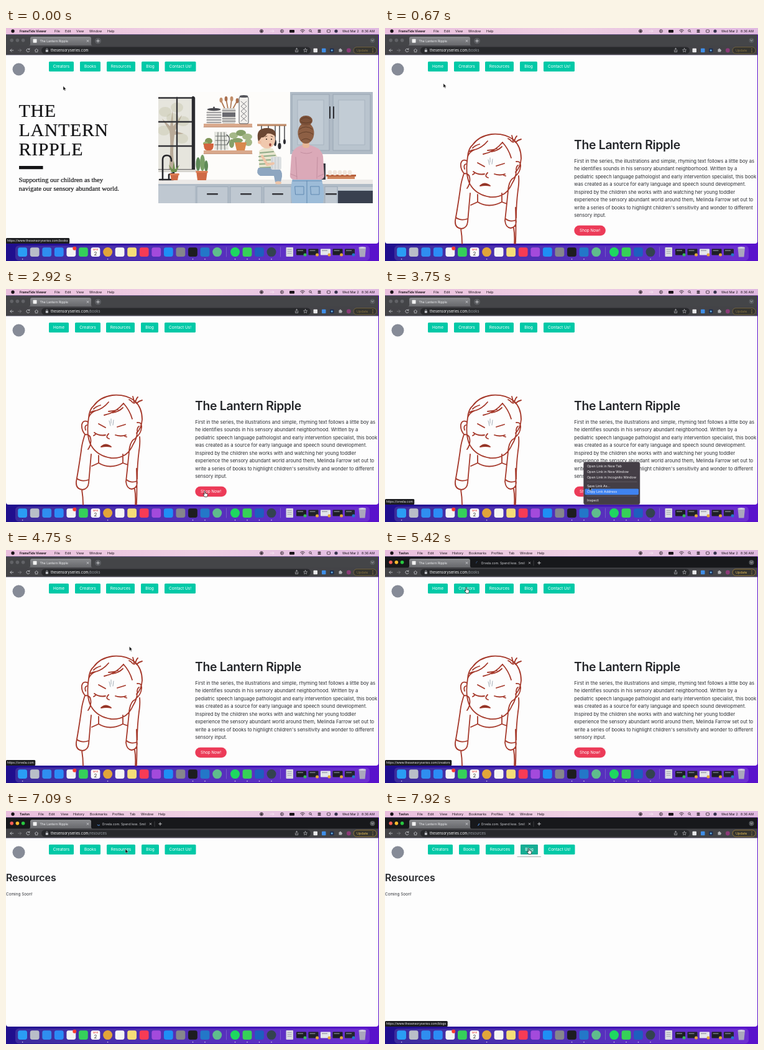
Animation, 600 px wide and 375 px high, one loop 8 s. Source, as an HTML page:

```html
<!DOCTYPE html>
<html lang="en">
<head>
<meta charset="utf-8">
<title>Screen recording</title>
<style>
html, body { margin: 0; width: 100%; height: 100%; overflow: hidden; background: #1f0f8c; }
svg { display: block; width: 100vw; height: 100vh; }
text { font-family: Inter, "Open Sans", sans-serif; white-space: pre; }
.serif { font-family: "Liberation Serif", "Noto Serif", serif; stroke: #141416; stroke-width: .2; }
</style>
</head>
<body>
<svg id="stage" viewBox="0 0 600 375" xmlns="http://www.w3.org/2000/svg"></svg>
<script>
const R = (x, y, w, h, fill, rx = 0, more = '') => `<rect x="${x}" y="${y}" width="${w}" height="${h}" rx="${rx}" fill="${fill}" ${more}/>`;
const C = (x, y, r, fill, more = '') => `<circle cx="${x}" cy="${y}" r="${r}" fill="${fill}" ${more}/>`;
const E = (x, y, rx, ry, fill) => `<ellipse cx="${x}" cy="${y}" rx="${rx}" ry="${ry}" fill="${fill}"/>`;
const F = (d, fill) => `<path d="${d}" fill="${fill}"/>`;
const L = (d, stroke, w = 1) => `<path d="${d}" fill="none" stroke="${stroke}" stroke-width="${w}" stroke-linecap="round" stroke-linejoin="round"/>`;
const T = (x, y, s, size, fill, more = '') => `<text x="${x}" y="${y}" font-size="${size}" fill="${fill}" ${more}>${s}</text>`;
const G = (id, body, more = '') => `<g id="${id}" ${more}>${body}</g>`;
const BOLD = 'font-weight="600"', MID = 'text-anchor="middle"';
const lines = (x, y, step, size, fill, rows) => rows.map((s, i) => T(x, y + i * step, s, size, fill)).join('');

const BRAND = 'The Lantern Ripple', TEAL = '#00c9a7', INK = '#24262a', BLACK = '#1a1218';

// Menu bar
const menus = items => items.map(([x, s], i) => T(x, 7, s, i ? 5.3 : 4.9, BLACK, i ? '' : 'font-weight="700"')).join('');
const menuBar = () => R(0, 0, 600, 10.5, 'url(#bar)') + C(11, 5, 2.7, BLACK) +
  G('menuIdle', menus([[22, 'FrameTide Viewer'], [78, 'File'], [95, 'Edit'], [113, 'View'], [134, 'Window'], [163, 'Help']])) +
  G('menuBrowser', menus([[22, 'Tavlon'], [52, 'File'], [69, 'Edit'], [88, 'View'], [108, 'History'], [135, 'Bookmarks'],
    [171, 'Profiles'], [199, 'Tab'], [217, 'Window'], [245, 'Help']])) +
  C(411, 5, 2.6, 'none', `stroke="${BLACK}" stroke-width=".8"`) + C(411, 5, 1.6, BLACK) + L('M425 5h6M429 3.5l2 1.5-2 1.5', '#f6e8f2', .8) +
  C(444, 5, 2.5, 'none', `stroke="${BLACK}" stroke-width=".7"`) + L('M443.4 3.9l1.7 1.1-1.7 1.1z', BLACK, .6) + R(456, 3, 8, 4.4, BLACK, 1) +
  L('M473.6 4q3.4-3 6.8 0M475 5.5q2-1.8 4 0', BLACK, .8) + C(477, 7, .7, BLACK) +
  L('M492 6.8l-1.6-1.6', BLACK, .8) + C(489.4, 4.3, 1.7, 'none', `stroke="${BLACK}" stroke-width=".7"`) +
  R(501.5, 2.8, 5, 1.8, BLACK, .9) + R(501.5, 5.5, 5, 1.8, BLACK, .9) +
  R(516.5, 3, 5, 4, 'none', .6, `stroke="${BLACK}" stroke-width=".7"`) + C(531, 5, 2.6, '#3a3550') +
  T(541, 7, 'Wed Mar 2', 5.2, BLACK) + T(572, 7, '8:36 AM', 5.2, BLACK);

// Browser frame
const cross = (x, y, c = '#e8e9ec') => L(`M${x - 1.3} ${y - 1.3}l2.6 2.6m0-2.6l-2.6 2.6`, c, .7);
const plus = x => L(`M${x - 2.3} 20.8h4.6m-2.3-2.3v4.6`, '#e4e5e8', .8);
const browser = () => R(0, 10.5, 599, 33, '#444548', 0, 'id="strip"') +
  G('lights', ['#ff5f57', '#febc2e', '#28c840'].map((c, i) => C(9.2 + i * 9.2, 19.7, 2.8, c)).join('')) +
  G('lightsOff', [0, 1, 2].map(i => C(9.2 + i * 9.2, 19.7, 2.8, '#626367')).join('')) +
  F('M36 28.5q3 0 3-3V17q0-3 3-3h92q3 0 3 3v8.5q0 3 3 3z', 'url(#tab)') + R(0, 28.4, 599, 15.1, '#434347') +
  R(43.5, 17.7, 6, 6, '#f2f2f2', .8) + T(54.5, 22.8, BRAND, 5.1, '#f2f3f5') + cross(131.5, 20.8) +
  G('oneTab', C(148, 20.8, 5, '#5a5c60') + plus(148)) +
  G('twoTabs', G('spinner', L('M149 18.3a2.5 2.5 0 0 1 2.5 2.5', '#5b9cf5', .9)) +
    T(154.5, 22.8, 'Orvela.com. Spend less. Smil', 5.1, '#d4d6da') + R(229, 15, 8, 12, 'url(#tabFade)') + cross(232.5, 20.8) +
    L('M239 17v8', '#55585c', .6) + plus(248)) +
  C(589.5, 20, 4, '#55585c') + L('M587.8 19.3l1.7 1.6 1.7-1.6', '#dadce0', .7) +
  L('M11.8 36h-5M9 33.8L6.8 36 9 38.2', '#d0d2d6', .8) + L('M19.5 36h5M22.3 33.8l2.2 2.2-2.2 2.2', '#808286', .8) +
  L('M37.6 34.3A2.6 2.6 0 1 0 37.9 37M37.9 32.9v1.7h-1.7', '#d0d2d6', .8) +
  L('M46.3 36l2.7-2.5 2.7 2.5M47.2 35.6v3h3.6v-3', '#d0d2d6', .7) +
  R(57, 30.5, 433, 11, '#28292c', 5.5) + R(63.8, 35.3, 4, 3.2, '#c8cace', .5) + L('M64.7 35v-1a1.1 1.1 0 0 1 2.2 0v1', '#c8cace', .6) +
  `<text x="72" y="38.1" font-size="5.8" fill="#f6f7f8">thesensoryseries.com<tspan id="path" fill="#9aa0a6"></tspan></text>` +
  L('M465.5 35.3v3.2h4.2v-3.2M467.6 37v-4.4m-1.3 1.2l1.3-1.3 1.3 1.3', '#d0d2d6', .6) +
  L('M481.6 32.8l.9 2 2.1.2-1.6 1.5.5 2.1-1.9-1.1-1.9 1.1.5-2.1-1.6-1.5 2.1-.2z', '#d0d2d6', .6) +
  R(494.5, 32.7, 6.5, 6.5, '#e8e8ea', 1) + R(508, 32.7, 6.5, 6.5, '#3f8ee8', 1) + R(521, 32.7, 6.5, 6.5, '#1d2f52', 1) + C(524.2, 36, 1.6, '#61a8dc') +
  R(535.5, 34, 4.6, 4.6, '#b4b6ba', .6) + C(537.8, 33.8, 1.1, '#b4b6ba') + C(540, 36.3, 1.1, '#b4b6ba') +
  C(551.3, 36, 3.4, '#8c3a78') +
  R(559, 30.8, 37, 10.4, '#35342f', 5.2, 'id="pill" stroke-width=".7"') + T(564, 38, 'Update', 5.4, '#8a7440', 'id="update"') +
  [33.6, 36, 38.4].map(y => C(590, y, .6, '#d0b060')).join('');

// Site navigation
const NAV = {
  main: [['Creators', 69, 40], ['Books', 119, 33], ['Resources', 162, 46], ['Blog', 218, 28], ['Contact Us!', 255.5, 50]],
  books: [['Home', 69, 32], ['Creators', 111, 41], ['Resources', 161, 46], ['Blog', 217, 28], ['Contact Us!', 255, 50]],
  creators: [['Home', 69, 32], ['Books', 111, 33], ['Resources', 154, 46], ['Blog', 210, 27.5], ['Contact Us!', 247.5, 50]]
};
const button = (s, x, w, fill) => R(x, 54, w, 16, fill, 1.6) + T(x + w / 2, 64.4, s, 6.5, '#fff', MID);
const nav = key => NAV[key].map(([s, x, w]) => button(s, x, w, TEAL)).join('');

// Home page
const drawer = (x, w) => R(x, 255.5, w, 27, '#bfc8d1', 0, 'stroke="#98a5b3" stroke-width=".8"') + R(x + w / 2 - 9, 266, 18, 2.4, '#34343a', 1);
const door = x => R(x, 107, 60, 90, '#b9c4ce', 0, 'stroke="#95a2b0" stroke-width=".9"') + R(x + 9, 116, 42, 72, '#c2ccd5', 0, 'stroke="#a3afbb" stroke-width=".8"');
const pot = (x, y, w, h) => F(`M${x} ${y}h${w}l-2 ${h}h${4 - w}z`, '#cf6a45') + R(x - .6, y, w + 1.2, 3, '#dc7d55');
const kitchen = () => R(245, 103, 345, 179, '#fdfcfa') +
  R(245, 111, 59, 118, '#e6e5dd') + F('M262 228q4-40 1-62l-12-20 13 12 4-26 1 26 14-18-11 26 14 4-15 2q-4 26 0 56z', '#b9aa98') +
  [[256, 135], [275, 128], [285, 150], [254, 165], [283, 178], [268, 145]].map(([x, y]) => E(x, y, 10, 8, '#bfc0a25c')).join('') +
  L('M245 112.5h58v116h-58M275 112v116M245 151h58M245 190h58', '#343438', 2.4) + L('M301 112v117', '#2a2a2e', 4.4) +
  R(245, 228, 64, 4, '#d8d6d0') +
  R(318, 154, 78, 5.6, '#d9a98c') + R(318, 197, 78, 5.6, '#d9a98c') + L('M318 159.4h78M318 202.4h78', '#b98a70', .8) +
  R(323, 132, 23, 22, '#eceae6', 2) + L('M323 136h23M323 140h23M323 144h23M323 148h23M323 152h23', '#5b5b60', 1.2) + E(334.5, 131, 11, 2.2, '#4a4a50') + C(334.5, 128, 1.5, '#4a4a50') +
  L('M352 130l-6-13M357 130l-3-16M361 130l2-16M365 130l7-13', '#b07b58', 1.8) + E(346, 116, 2.5, 4, '#c28e69') + E(354, 114, 2.4, 4, '#a96f4e') + E(363, 114, 2.5, 4, '#c28e69') + E(372, 117, 2.4, 4, '#a96f4e') +
  R(348, 129, 21, 25, '#d5d3cf', 2) + L('M348 133h21M348 146h21M348 150h21', '#6a6a70', 1.2) + R(348, 136, 21, 7, '#6a6a70') +
  R(375, 111, 15, 43, '#f2f0ed', 2, 'stroke="#55565c" stroke-width="1"') + E(382.5, 110, 7, 2, '#55565c') + L('M378 118l9 8-9 8 9 8-9 8M387 118l-9 8 9 8-9 8 9 8', '#6b6b70', .8) +
  E(326, 182, 6, 5, '#81965a') + E(321, 186, 4, 3, '#9caf70') + F('M318 186h16q0 11-5 11h-6q-5 0-5-11z', '#d2643e') +
  F('M335 167h20l3 29h-23z', '#e4e5df') + L('M341 168l-1 28M346 168v28M351 168l1 28M337 174h18M337 181h19M336 188h20', '#5a5f5c', .9) + L('M355 172q8 5 1 15', '#5a5f5c', 1.5) +
  [[366, 173, 7, 5], [378, 169, 8, 5], [388, 175, 8, 5], [372, 181, 9, 4], [390, 184, 6, 6], [363, 186, 4, 7]].map(([x, y, a, b], i) => E(x, y, a, b, i % 2 ? '#86a069' : '#a5b888')).join('') +
  F('M368 184h19l-3 13h-13z', '#d9894e') +
  R(404, 154.5, 47, 3.4, '#c18e6c') + L('M411 158v5M422 158v5M433 158v24M440 158v26M448 158v22', '#2e2e33', 1.3) + E(433, 185, 2, 5, '#2e2e33') + E(440, 190, 2.6, 5, '#2e2e33') + E(448, 183, 2, 4, '#2e2e33') +
  R(457, 103, 133, 100, '#b0bbc6') + door(460) + door(526) + L('M521 127v18M527 127v18', '#2c2c31', 2) +
  R(505, 218, 9, 27, '#3a3b43') + R(515, 236, 48, 3, '#b8613d') + R(517, 239, 44, 4, '#cf855c') + [521, 529, 537, 545, 553].map(x => E(x, 233, 3.4, 4.2, '#f1e6dc')).join('') +
  R(245, 244, 345, 8, '#eceae8') + R(245, 251, 345, 31, '#b0bbc6') + drawer(307, 50) + drawer(361, 50) + drawer(415, 44) + drawer(513, 20) + R(245, 254, 59, 28, '#bfc8d1') +
  R(534, 262, 56, 20, '#39404f') + R(534, 256, 56, 5, '#c8ced4') +
  L('M252 244v-32q0-7 7-7t7 9', '#27272b', 2.6) + L('M262 244v-8l8-3M247 244h22', '#27272b', 2.6) +
  F('M266 232l-4-12 6 8 2-14 2 14 7-8-5 12z', '#6e9150') + pot(264, 234, 14, 11) +
  E(309, 219, 3.6, 11, '#5f8a58') + E(316, 217, 4, 13, '#79a067') + E(322, 222, 3, 9, '#5f8a58') + pot(306, 230, 18, 15) +
  F('M407 198q8-8 22-4l8 14-4 20h-26z', '#e8e6cf') + L('M409 201l21-2M407 207l26-2M407 213l24-1M408 219l22-1M409 225l21-1', '#8fa986', 2) +
  F('M406 225h30q9 3 8 14l-2 9h-9l-2-10h-22q-8-4-3-13z', '#8ea6c0') + E(438, 249, 5, 2.6, '#eec5a8') +
  R(426, 207, 17, 21, '#dcdfe1', 3) + L('M428 209v17M433 208v19M438 208v19', '#b9c0c6', .8) + L('M412 206l8 14 10-2', '#efc4a8', 4) +
  E(420, 180, 13, 14, '#f0c8ad') + F('M406 183q-6-22 14-22 15 0 14 14-7-6-14-5-4 7-9 6z', '#6b4733') + C(408, 184, 2.8, '#efbc9e') + C(419, 179, 1, '#33241e') + C(427, 179, 1, '#33241e') + E(425, 188, 1.8, 2.4, '#a1483e') + L('M417 175l3-1M426 174l3 1', '#5d3c2a', .8) +
  F('M461 242h46q7 22 3 40h-50q-4-22 1-40z', '#9dbcd8') + L('M484 246v36M465 255h14v13h-13zM490 255h14v13h-13zM461 246h47', '#6189b2', 1) +
  F('M470 191q13-7 26 0 12 4 14 16l2 32q-2 6-9 5h-40q-7-1-6-8l2-30q2-11 11-15z', '#dba9b8') + L('M466 208l2 35M501 208l-1 34M458 235l10 4M511 235l-9 4M474 200q10 4 18 0', '#bf8b9c', .9) +
  R(477, 178, 11, 15, '#e7b798', 4) + E(482.5, 169, 13, 17, '#8d5f44') + E(482.5, 149, 10.5, 8, '#7c5139') + L('M475 147q7-6 15 0M474 151q8 4 17 0M472 163q10-8 21 0M471 171q12-8 23 0M475 181q7-6 15 0', '#5d3b28', .9);
const home = () => nav('main') +
  ['THE', 'LANTERN', 'RIPPLE'].map((s, i) => T(20.6, 143 + i * 31, s, 30, '#141416', 'class="serif" letter-spacing=".6"')).join('') +
  R(21, 222, 38.5, 5.2, '#141416') +
  T(20.5, 248, 'Supporting our children as they', 10.75, '#141416', 'class="serif"') +
  T(20.5, 262.3, 'navigate our sensory abundant world.', 10.75, '#141416', 'class="serif"') +
  `<g clip-path="url(#photo)">${kitchen()}</g>`;

// Books page
const boy = () => {
  const pen = '#a5392b';
  const ink = [
    'M133 207q1-13 8-19 10-14 30-17 21-2 36 9 12 11 12 30-1 14-9 22',
    'M133 207q3-8 11-11 12-3 21-14M144 196q-4 0-9 3M152 187q-7 2-11 6M158 203q19-4 31-19M165 197q8 0 15-3M189 184q10 11 14 25M171 199q10-1 17-8',
    'M206 184q0-6-2-11M208 183q1-6 4-9M210 184q4-4 9-5M204 183q-3-4-6-5',
    'M133 207q-4 25 2 41 9 20 34 24 25 2 35-21 7-11 7-21',
    'M132 214q-8-4-10 4-1 9 5 16M130 219q-4 1-2 8M211 215q8-1 7 8-1 10-9 16M214 221q-3 2-3 7',
    'M149 217l11 6M179 222l13-4', 'M142 231q8 6 18 4M176 235q9 3 17 0M144 234l-3 2M191 237l3 1',
    'M165 233q-6 6 1 8', 'M153 254q7-7 16 0-7-2-16 0z',
    'M127 234q8 0 9 6 2 10-4 18M127 234q-5 15-6 26-4 28-8 50-1 12 10 13 9-1 10-11 2-24 4-46M114 305q8 6 19 2',
    'M215 238q1 10-1 22-3 24-3 46M198 262q-3 30-5 48 1 11 9 12 9-1 9-11M209 240q-10 4-11 22M194 307q7 6 17 2',
    'M149 268v12M188 266v14M149 280q18 11 39 0M149 280l-11 5M188 280l8 3M210 289q1 28 0 58M122 323q2 12 2 24M207 322q2 12 1 25'
  ];
  return L(ink.join(''), pen, 1.8) + F('M153 254q7-7 16 0-7-2-16 0z', '#8d3527') +
    L('M166 212l2 8M173 211l-1 8M169 209v7', '#8b97a2', .8);
};
const books = () => nav('books') + boy() +
  T(304, 194.6, BRAND, 19.4, INK, `${BOLD} letter-spacing="-.3"`) +
  lines(304.3, 216.8, 12.5, 7.67, '#2c2e33', [
    'First in the series, the illustrations and simple, rhyming text follows a little boy as',
    'he identifies sounds in his sensory abundant neighborhood. Written by a',
    'pediatric speech language pathologist and early intervention specialist, this book',
    'was created as a source for early language and speech sound development.',
    'Inspired by the children she works with and watching her young toddler',
    'experience the sensory abundant world around them, Melinda Farrow set out to',
    "write a series of books to highlight children's sensitivity and wonder to different",
    'sensory input.']) +
  R(304.3, 317.8, 50.6, 16.4, '#ec3b58', 8.2) + T(329.6, 328.4, 'Shop Now!', 6.4, '#fff', MID);

// Creators and resources pages
const creators = () => R(150, 50, 54.5, 23.6, '#fff', 1) + L('M150 73.6h54.5', '#a3a6aa', .9) + nav('creators') +
  T(51, 104.8, `Meet the creators of ${BRAND}:`, 9.4, INK, BOLD) +
  T(51, 126.2, 'Melinda Farrow - Author', 6.3, INK, BOLD) +
  lines(51, 146.4, 10, 6.5, '#303237', [
    "It's to no-one's surprise, but her own, that Melinda ended up in the pediatric field. The eldest of four, she started building her kid skills well before the age of 5.",
    'Melinda evolved her skillset from bossy big sister to summer swim teacher. With her heart set on becoming an architect, Melinda worked for a firm where she spent',
    'her hours re-doing the library and copying CAD drawings. It was about 30 minutes into the job that Melinda realized that this was definitely not her future. Instead of',
    'going to university like all her peers she decided to study abroad for a year in Argentina, where she found her passion for language acquisition and development. Fast',
    'forward a few years and you will find Melinda has added a few titles to her name: wife, mother, speech language pathologist, early intervention specialist, certified',
    'lactation counselor, and author. Melinda provides an array of one-on-one speech, language, and/or feeding interventions to infants and children. She is often seen',
    "teaching parent and child classes or in her community working with parents and teachers through her workplace. Melinda's love for children's books really cemented",
    'through her work and motherhood. One book has the magical ability to be scaffolded to benefit a child of any age. The children she works with and her son inspire',
    'her every day and fuel her passion!']) +
  T(51, 246.2, 'Tilda Moren - Illustrator', 6.3, INK, BOLD) +
  lines(51, 266.4, 10, 6.5, '#303237', [
    'Tilda Moren grew up dancing to the beat of her own drum in the Western Lake Shore. At a young age, she had a passion for life that expressed itself through art,',
    'music, sports and spending time in the outdoors. With curiosity and a love for helping others, Tilda moved to California after high school to pursue education in',
    'becoming a math teacher. The universe had other plans. After meeting her now husband at Mar Alto, Tilda surprised no one when she switched her major to',
    'Anthropology, Sociology and Geography and ultimately went on to law school to become an attorney. Tilda now lives happily with her husband, three young children',
    'and two boston terriers in a small town in central California. Expressing emotion and ingenuity through art, Tilda continues to be inspired by the world around her and',
    "is excited to share her love of living mindfully and thinking outside of the box with her latest pursuit into illustrating children's books."]);
const resources = () => nav('main') + T(0, 112.6, 'Resources', 15.8, INK, BOLD) + T(0, 136.3, 'Coming Soon!', 6.4, '#303237');

// Context menu
const contextMenu = () => R(319.5, 278.5, 90.5, 68.5, '#443e46', 3, 'stroke="#6d676e" stroke-width=".5"') +
  R(321.5, 0, 86.5, 9.6, '#3f83f0', 1.6, 'id="pick"') +
  [[285, 'Open Link in New Tab'], [294.3, 'Open Link in New Window'], [303.4, 'Open Link in Incognito Window'], [317.2, 'Save Link As...'], [326.4, 'Copy Link Address'], [340.3, 'Inspect']]
    .map(([y, s]) => T(325, y + 2, s, 5.4, '#f6f4f6')).join('') +
  L('M325 310.3h80M325 333.4h80', '#716a72', .6);

// Dock: plain tiles and circles
const tile = (x, c) => R(x - 7.4, 353.2, 14.8, 14.8, c, 3.4);
const disc = (x, c) => C(x, 360.6, 7.5, c);
const dock = () => R(15, 350.2, 570, 24, '#ffffff1f', 5.5) +
  ['#2a9df4', '#b9bec8', '#2f8ef0', '#2b8cf6', '#f3f3f3', '#35d05a', '#fafafa', null, '#f5f5f5', '#f6dd78', '#f83b55', '#a34adc', '#1e8ff5', '#85868c', '#1d1d20', '#2377c8', null]
    .map((c, i) => c ? tile(26.6 + i * 19.56, c) : '').join('') +
  disc(163.6, '#e2a53a') + disc(339.7, '#5fbd8d') + C(110.3, 354.7, 3, '#fb3b30') +
  T(144, 358.2, 'MAR', 3.6, '#e8392f', MID) + T(144, 366.2, '2', 8, '#333', MID) +
  L('M354.5 353v15M441.5 353v15', '#ffffff55', .6) +
  disc(368.5, '#1ed760') + tile(388, '#36d158') + tile(407.5, '#1d5fbf') + disc(427, '#33434f') +
  R(450.5, 353, 11.5, 15, '#dadbe0', 1) + L('M453 356.5h6M453 359.5h6M453 362.5h6', '#8f929c', .7) +
  [['#1d1f24', '#35b95a'], ['#202228', '#e2a53a'], ['#e4e6ea', '#e2a53a'], ['#1d1f24', '#e2a53a'], ['#23262e', '#2377c8']]
    .map(([c, b], i) => R(467 + i * 19.5, 355.6, 16, 10, c, 1) + R(469 + i * 19.5, 357.6, 9, 1.2, '#8d929c') + C(481 + i * 19.5, 365, 2.5, b)).join('') +
  F('M567.5 353.6h11.5l-1.5 15h-8.5z', '#aaa7bd') + E(573.2, 353.6, 5.8, 1.5, '#d0cede') +
  [26.6, 163.6, 300.5, 320, 368.5, 388, 407.5, 427].map(x => C(x, 372, .8, '#e6e0f4')).join('');

const grad = (id, stops, dir = '') => `<linearGradient id="${id}" ${dir}>${stops.map((c, i) => `<stop offset="${i / (stops.length - 1)}" stop-color="${c}"/>`).join('')}</linearGradient>`;
const stage = document.getElementById('stage');
stage.innerHTML = `<defs>${grad('bar', ['#e9bfdd', '#efd0e3', '#e0b9e1'])}${grad('wall', ['#1f0f8c', '#3413a6', '#4313b8', '#5a12cc'])}
  ${grad('tab', ['#8a8b8e', '#66676b'], 'x2="0" y2="1"')}${grad('tabFade', ['#17181b00', '#17181b'])}
  <clipPath id="photo"><rect x="245" y="103" width="345" height="179"/></clipPath></defs>` +
  R(0, 0, 600, 375, 'url(#wall)') + menuBar() + browser() +
  F('M0 43.4h599V343q0 4-4 4H4q-4 0-4-4z', '#fdfdfd') + C(20.5, 66.5, 10, '#868b97') +
  G('home', home()) + G('books', books()) + G('creators', creators()) + G('resources', resources()) +
  G('hoverRes', button('Resources', 154, 46, '#17ad94')) +
  G('hoverBlog', L('M213 73.6h37.5', '#a3a6aa', .9) + button('Blog', 218, 28, '#17ad94')) +
  G('status', R(0, 338, 50, 9, '#1b1c1f', 1.5) + T(2, 344.3, '', 4.95, '#f4f4f6')) +
  G('menu', contextMenu()) + dock() +
  G('arrow', '<path d="M0-.5v6.8l1.6-1.4 1 2.4 1.1-.5-1-2.3h2.1z" fill="#111" stroke="#fff" stroke-width=".4"/>') +
  G('hand', '<path d="M-1 .2q0-1.1.8-1.1t.8 1.1v2.6l3 .6q.9.3.8 1.4l-.5 2.6-.6 1.2h-3.7L-2.8 5q-.5-.9.3-1.1l1.5.9z" fill="#fff" stroke="#111" stroke-width=".7"/>');

const $ = id => document.getElementById(id);
const show = (id, on) => $(id).setAttribute('display', on ? 'inline' : 'none');
const within = (t, a, b) => t >= a && t < b;
// Last entry whose start time has passed
const at = (list, t) => list.filter(e => t >= e[0]).pop()[1];

const PAGES = [[0, 'home'], [580, 'books'], [5490, 'creators'], [6820, 'resources']];
const SITE = 'https://www.thesensoryseries.com/', SHOP = 'https://orvela.com';
const STATUS = [[0, SITE + 'books'], [580, ''], [2990, SHOP], [5080, ''], [5240, SITE + 'creators'], [5490, ''], [6080, SITE + 'resources'], [6820, ''], [7400, SITE + 'blogs']];
const PICKS = [[0, 0], [3410, 312.4], [3660, 321.6], [3910, 298.5], [4080, 280.2]];
const TRACK = [[0, 92, 94], [400, 96, 98], [1250, 87, 62.5], [1800, 87, 62.5], [2650, 320, 326], [3250, 320, 326], [3650, 328.5, 318], [3850, 328.5, 318],
  [4120, 334, 284], [4250, 334, 284], [4740, 198.5, 156], [5200, 131, 61], [5520, 131, 61], [6000, 167, 62], [6850, 167, 62], [7400, 231.5, 61], [8000, 231.5, 61]];

function cursor(t) {
  const i = TRACK.findIndex(p => p[0] > t), [t0, x0, y0] = TRACK[i - 1], [t1, x1, y1] = TRACK[i];
  const u = (t - t0) / (t1 - t0), k = u * u * (3 - 2 * u);
  return [x0 + (x1 - x0) * k, y0 + (y1 - y0) * k];
}

function draw(now) {
  const t = Math.floor((now % 8000) * .012 + 1e-6) / .012;
  const page = at(PAGES, t), active = t >= 4820;
  PAGES.forEach(([, id]) => show(id, id === page));
  $('path').textContent = page === 'home' ? '' : '/' + page;

  for (const id of ['menuBrowser', 'lights', 'twoTabs']) show(id, active);
  for (const id of ['menuIdle', 'lightsOff', 'oneTab']) show(id, !active);
  $('strip').setAttribute('fill', active ? '#17181b' : '#444548');
  $('update').setAttribute('fill', active ? '#e8bf58' : '#8a7440');
  $('pill').setAttribute('stroke', active ? '#b8923c' : '#8a7440');
  $('spinner').setAttribute('transform', `rotate(${t * .36 + 110} 149 20.8)`);
  $('spinner').setAttribute('opacity', t > 6600 ? 1 : .4);

  const link = at(STATUS, t), [box, label] = $('status').children;
  show('status', link);
  if (link && label.textContent !== link) label.textContent = link;
  if (link) box.setAttribute('width', label.getComputedTextLength() + 4.5);

  show('menu', within(t, 3240, 4240));
  const pick = at(PICKS, t);
  show('pick', pick);
  $('pick').setAttribute('y', pick);
  show('hoverRes', within(t, 5980, 6820));
  show('hoverBlog', t >= 7300);

  const point = within(t, 2600, 3240) || within(t, 5150, 5560) || within(t, 5900, 6900) || t >= 7300;
  show('hand', point);
  show('arrow', !point);
  const [x, y] = cursor(t);
  $(point ? 'hand' : 'arrow').setAttribute('transform', `translate(${x} ${y})`);
}

const start = performance.now();
function loop() {
  draw(performance.now() - start);
  requestAnimationFrame(loop);
}
loop();
</script>
</body>
</html>
```
